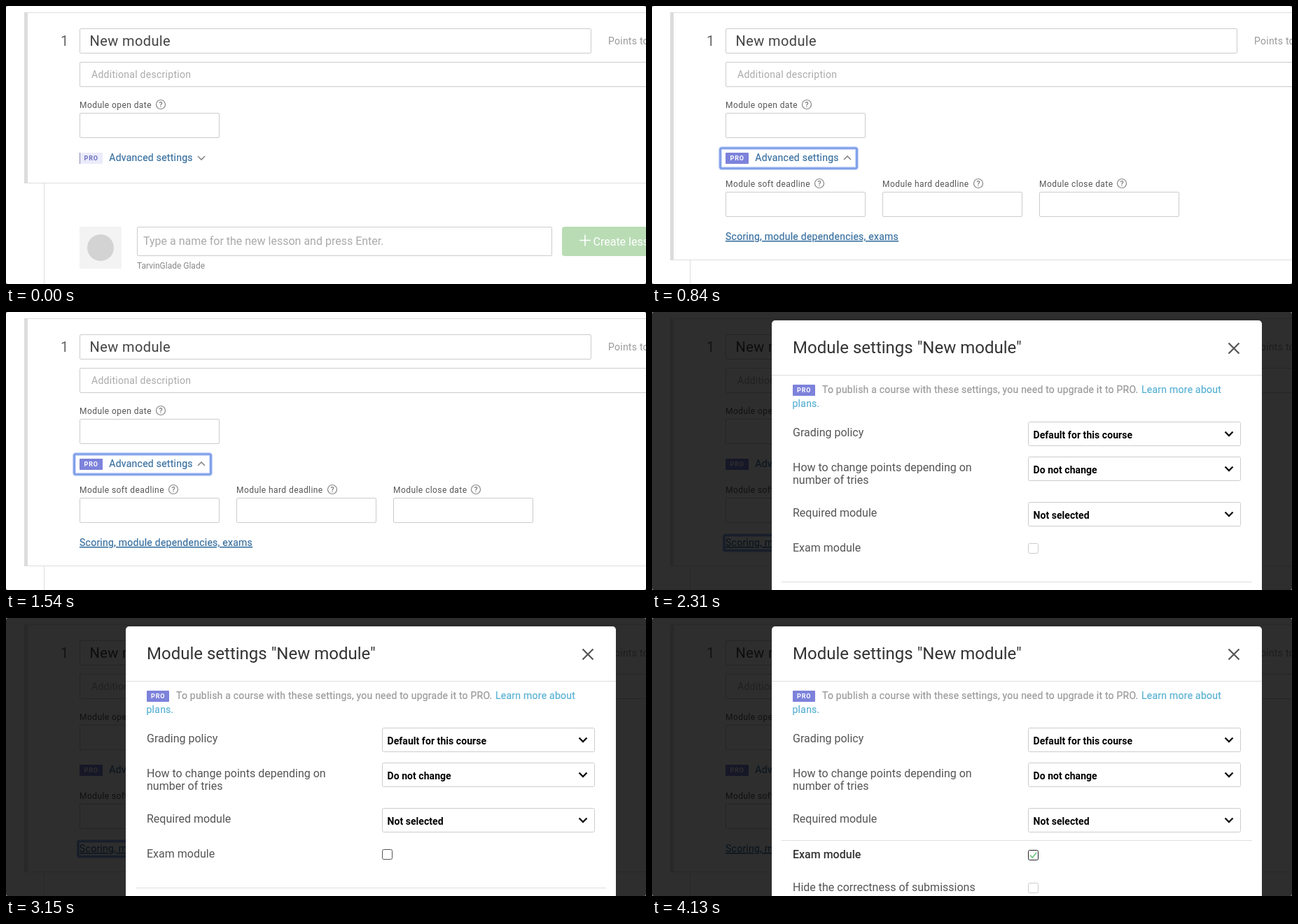
Write an HTML page that moves like this. It is 914 by 398 pixels and loops after 4.9 s.

```html
<!DOCTYPE html>
<html lang="en">
<head>
<meta charset="utf-8">
<title>Module settings</title>
<style>
html, body { margin: 0; width: 100%; height: 100%; overflow: hidden; background: #777; }
svg { display: block; width: 914px; height: 398px; border-radius: 3px; background: #fff; }
text { font: 14px Roboto, Arial, sans-serif; fill: #999; white-space: pre; }
.field { fill: #fff; stroke: #ccc; }
.rule { stroke: #dedede; fill: none; }
.spaced { letter-spacing: .25px; }
.big { font-size: 20px; letter-spacing: .4px; fill: #444; }
.label { font-size: 12px; letter-spacing: .43px; fill: #555; }
.link { letter-spacing: .25px; fill: #39709f; stroke: #39709f; stroke-width: .2px; }
.note { letter-spacing: .22px; stroke: #999; stroke-width: .2px; }
.learn { letter-spacing: .25px; fill: #57b0d2; stroke: #57b0d2; stroke-width: .2px; }
.row { font-size: 16px; fill: #555; }
.value { font-weight: 700; letter-spacing: .05px; fill: #000; }
.pro { font-size: 9px; font-weight: 700; letter-spacing: .9px; }
.arrow { fill: none; stroke: #888; stroke-width: 1.6; }
.halo { fill: none; stroke: #c3d2f7; stroke-width: 5; }
.ring { fill: none; stroke: #7295e6; stroke-width: 2.2; }
</style>
</head>
<body>
<svg viewBox="0 0 914 398">
  <defs>
    <g id="help">
      <circle r="6.5" fill="none" stroke="#888" stroke-width="1.2"/>
      <text y="3.8" text-anchor="middle" style="font-size:10.5px;font-weight:500;fill:#777">?</text>
    </g>
    <rect id="date" class="field" width="199" height="35" rx="1.5"/>
    <g id="select">
      <rect class="field" width="303" height="34" rx="2"/>
      <path d="M281 14l5.5 5.5 5.5-5.5" fill="none" stroke="#111" stroke-width="2.4"/>
    </g>
    <rect id="box" width="14" height="14" rx="2" fill="#fff"/>
  </defs>

  <path id="bar" fill="#dcdcdc"/>
  <path id="frame" class="rule"/>

  <text class="big" x="78" y="57" style="fill:#666">1</text>
  <rect class="field" x="105.5" y="32.5" width="730" height="35" rx="1.5"/>
  <text class="big" x="119.5" y="57">New module</text>
  <text class="spaced" x="860" y="55">Points total</text>
  <rect class="field" x="105.5" y="80.5" width="830" height="35" rx="1.5"/>
  <text x="122" y="103" style="letter-spacing:.28px;fill:#aaa">Additional description</text>
  <text class="label" x="105" y="146">Module open date</text>
  <use href="#help" x="221" y="141"/>
  <use href="#date" x="105.5" y="153.5"/>

  <g id="focus">
    <rect class="halo" x="97.5" y="203.5" width="195" height="29" rx="2"/>
    <rect class="ring" x="97.5" y="203.5" width="195" height="29" rx="2"/>
  </g>
  <rect id="badge" x="105" y="210" width="33" height="16" rx="1"/>
  <path id="edge" d="M105.5 210v16" stroke="#8589b5"/>
  <text id="badgeText" class="pro" x="111.5" y="221">PRO</text>
  <text class="link" x="147.3" y="222">Advanced settings</text>
  <path id="chevron" class="arrow"/>

  <g id="lesson">
    <rect x="105" y="316" width="60" height="60" fill="#f3f3f3"/>
    <circle cx="135" cy="346" r="19" fill="#d3d3d3"/>
    <rect class="field" x="187.5" y="316.5" width="592" height="41" rx="1.5"/>
    <text x="196" y="342" style="font-size:16px;fill:#aaa">Type a name for the new lesson and press Enter.</text>
    <text x="187" y="376" style="font-size:12px;fill:#888">TarvinGlade Glade</text>
    <rect x="794" y="316" width="150" height="42" rx="4" fill="#b9dcb5"/>
    <path d="M819 335.5h16M827 327.5v16" stroke="#fff" stroke-width="1.6"/>
    <text x="838.5" y="343" style="font-size:16px;fill:#fff">Create lesson</text>
  </g>

  <g id="advanced">
    <text class="label" x="105" y="259">Module soft deadline</text>
    <use href="#help" x="239" y="254"/>
    <use href="#date" x="105.5" y="266.5"/>
    <text class="label" x="329" y="259">Module hard deadline</text>
    <use href="#help" x="466" y="254"/>
    <use href="#date" x="329.5" y="266.5"/>
    <text class="label" x="553" y="259">Module close date</text>
    <use href="#help" x="671" y="254"/>
    <use href="#date" x="553.5" y="266.5"/>
    <g id="linkFocus">
      <rect class="halo" x="103" y="319.5" width="251" height="22" rx="2"/>
      <rect class="ring" x="103" y="319.5" width="251" height="22" rx="2"/>
    </g>
    <text class="link" x="105" y="335" text-decoration="underline">Scoring, module dependencies, exams</text>
  </g>

  <g id="dialog">
    <rect width="914" height="398" opacity=".82"/>
    <rect x="171" y="12" width="700" height="400" rx="5" fill="#fff"/>
    <text x="201" y="59" style="font-size:24px;fill:#333">Module settings "New module"</text>
    <path d="M823.5 44.5l15 15m0-15l-15 15" stroke="#555" stroke-width="2.2"/>
    <path class="rule" d="M171 90.5h700"/>
    <rect x="201" y="104" width="32" height="16" rx="1" fill="#7d82db"/>
    <text class="pro" x="207" y="115" style="fill:#fff">PRO</text>
    <text class="note" x="243" y="116">To publish a course with these settings, you need to upgrade it to PRO.</text>
    <text class="learn" x="699" y="116">Learn more about</text>
    <text class="learn" x="200.5" y="136">plans.</text>
    <text class="row" x="201" y="178">Grading policy</text>
    <text class="row" x="201" y="228">How to change points depending on</text>
    <text class="row" x="201" y="246">number of tries</text>
    <text class="row" x="201" y="293">Required module</text>
    <use href="#select" x="537.5" y="157.5"/>
    <text class="value" x="544.5" y="181">Default for this course</text>
    <use href="#select" x="537.5" y="207.5"/>
    <text class="value" x="544.5" y="231">Do not change</text>
    <use href="#select" x="537.5" y="272.5"/>
    <text class="value" x="544.5" y="296">Not selected</text>
    <path id="divider" class="rule"/>
    <text id="exam" class="row" x="201" y="343">Exam module</text>
    <g id="check">
      <use id="checkBox" href="#box" x="537.5" y="331.5"/>
      <path id="tick" d="M540 338.5l3.2 3.6 6-7.4" fill="none" stroke="#74cb86" stroke-width="1.8"/>
    </g>
    <g id="hide">
      <text class="row" x="201" y="391">Hide the correctness of submissions</text>
      <use href="#box" x="537.5" y="379.5" stroke="#ccc"/>
    </g>
  </g>
</svg>
<script>
const LOOP = 4900, STEP = 70;
const $ = id => document.getElementById(id);
const set = (id, attrs) => {
  for (const name in attrs) $(id).setAttribute(name, attrs[name]);
};
const show = (id, on) => set(id, { display: on ? 'inline' : 'none' });
const clamp = v => Math.max(0, Math.min(1, v));

function draw(t) {
  t = Math.floor(t / STEP) * STEP;
  const faded = t < 70, open = t >= 840, modal = t >= 2310;
  const hover = t >= 3150, ticked = t >= 3220, exam = t >= 3850;
  const bottom = open ? 363 : 253;

  set('bar', { d: `M26 9h5V${bottom + 1}h-5z` });
  set('frame', { d: `M31 9.5H914M31 ${bottom + .5}H914M54.5 ${bottom + 1}V398` });
  set('badge', { fill: faded ? '#ebebfb' : '#7d82db' });
  $('badgeText').style.fill = faded ? '#686dbd' : '#fff';
  set('chevron', { d: open ? 'M274 220l5-5 5 5' : 'M274 215l5 5 5-5' });
  show('edge', faded);
  show('lesson', !open);
  show('advanced', open);
  show('focus', open && !modal);
  show('linkFocus', modal && !ticked);

  show('dialog', modal);
  set('checkBox', { stroke: ticked ? '#222' : hover ? '#555' : '#ccc' });
  set('tick', { opacity: clamp((t - 3150) / 210) });
  set('check', { transform: `translate(0 ${exam ? 1 : 0})` });
  set('divider', { d: `M185 ${exam ? 318.5 : 386.5}h672` });
  set('exam', { y: exam ? 344 : 343 });
  $('exam').style.fontWeight = exam ? 500 : 400;
  $('exam').style.fill = exam ? '#333' : '#555';
  set('hide', { opacity: clamp((t - 3780) / 140) });
}

const start = performance.now();
function tick() {
  draw((performance.now() - start) % LOOP);
  requestAnimationFrame(tick);
}
tick();
</script>
</body>
</html>
```
